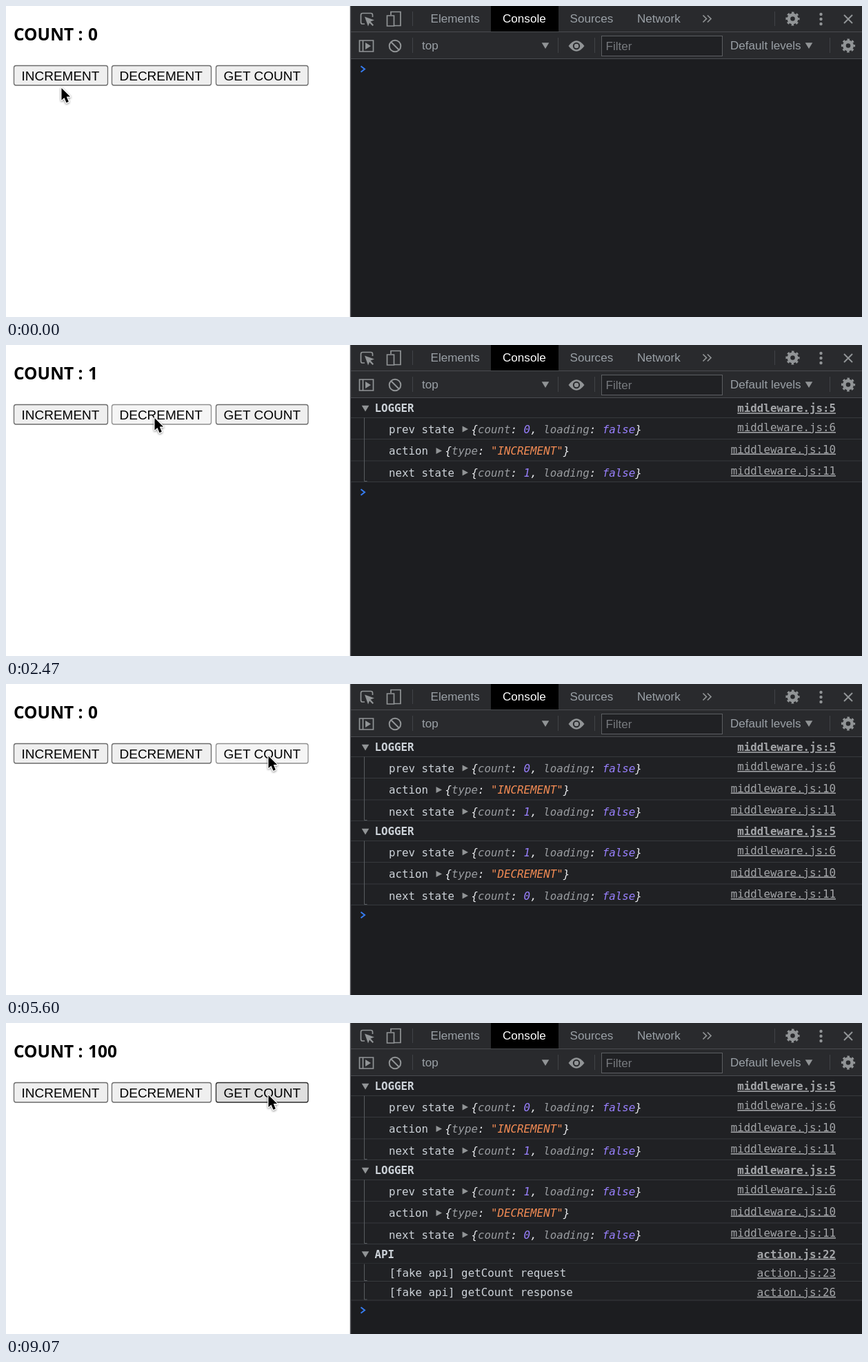
Animation, 1241 px wide and 451 px high, one loop 9270 ms. Source, as an HTML page:

```html
<!DOCTYPE html>
<html lang="en">
<head>
<meta charset="utf-8">
<title>Counter with logger</title>
<style>
  html, body { margin: 0; width: 100%; height: 100%; overflow: hidden; background: #fff; }
  svg { display: block; }
  .count { font: 600 24.5px "Noto Sans", sans-serif; }
  .btn text { font: 19px "Liberation Sans", Arial, sans-serif; fill: #000; }
  .btn rect { fill: #efefef; stroke: #6b6b6b; stroke-width: 1.3; }
  .btn.hover rect { fill: #f5f5f5; stroke: #8f8f8f; }
  .btn.pressed rect { fill: #dfdfdf; stroke: #2c2c2c; }
  .ui { font: 17.1px "Liberation Sans", Arial, sans-serif; fill: #9aa0a6; }
  .log { font: 15.8px "DejaVu Sans Mono", monospace; fill: #cdd3d9; }
  .log .head { font-weight: bold; }
  .log .link { fill: #a4a6a9; text-anchor: end; text-decoration: underline; }
  .obj { font-style: italic; fill: #e8eaed; }
  .key { fill: #9a9da1; }
  .num { fill: #9980ff; }
  .str { fill: #f28b54; }
  .icon { fill: none; stroke: #919496; stroke-width: 1.7; }
  .solid { fill: #919496; }
  .line { fill: none; stroke: #36393d; }
  .cursor { filter: drop-shadow(0 1.5px 1.5px #0007); }
</style>
</head>
<body>
<svg width="1241" height="451" viewBox="0 0 1241 451">
  <defs>
    <g id="gear" class="icon">
      <circle r="5.6" stroke-width="4.6"/>
      <circle r="8.6" stroke-width="3" stroke-dasharray="3.4 3.354" stroke-dashoffset="1.7"/>
    </g>
    <path id="down" class="solid" d="M-5.3-4.2H5.3L0 4.6Z"/>
  </defs>

  <text class="count" x="11" y="50">COUNT :</text>
  <text class="count" id="value" x="119" y="50"></text>
  <g id="buttons"></g>

  <rect x="499" width="742" height="451" fill="#1c1d20"/>
  <rect x="499" width="742" height="77" fill="#292a2d"/>
  <rect x="703" width="98" height="37" fill="#000"/>
  <path d="M500 37.5H1241M500 76.5H1241" stroke="#4a4c50"/>
  <path d="M589.5 8V29M1114.5 8V29M589.5 46V68M800.5 46V68M853.5 46V68M1194.5 46V68" stroke="#414347"/>

  <g class="ui">
    <text x="615.5" y="24">Elements</text>
    <text x="720" y="24" fill="#fff">Console</text>
    <text x="817.5" y="24">Sources</text>
    <text x="915" y="24">Network</text>
    <text x="603" y="63">top</text>
    <rect x="863.5" y="43.5" width="175" height="29" fill="#202124" stroke="#5c5e62"/>
    <text x="869.5" y="64" fill="#777a7e">Filter</text>
    <text x="1050" y="63">Default levels</text>
  </g>

  <g class="icon">
    <path d="M520 26H517Q514.500 26 514.500 23.500V13Q514.500 10.500 517 10.500H529Q531.500 10.500 531.500 13V16"/>
    <path class="solid" stroke="none" d="M520 15.500L534 20.500 528.500 22.500 533 27.500 531.500 29 527 24.500 525 29.500Z"/>
    <path d="M558 13V8.500H572V28.500H563M552.500 14H562.500V29H552.500Z"/>
    <path d="M1010.500 13.500L1015.500 18.500 1010.500 23.500M1017 13.500L1022 18.500 1017 23.500"/>
    <path d="M1215 13L1227 25M1227 13L1215 25" stroke-width="2"/>
    <path d="M512.500 50H532.500V66H512.500ZM517.500 50V66"/>
    <path class="solid" stroke="none" d="M521 53V63L529 58Z"/>
    <circle cx="564" cy="58" r="8.300" stroke-width="2"/>
    <path d="M558 52L570 64" stroke-width="2"/>
    <path class="solid" stroke="none" d="M815.500 58Q827 42.500 838.500 58 827 73.500 815.500 58Z"/>
    <circle cx="827" cy="58" r="4.200" stroke="#292a2d" stroke-width="2"/>
  </g>
  <g class="solid">
    <circle cx="1181.500" cy="12" r="2.200"/>
    <circle cx="1181.500" cy="19" r="2.200"/>
    <circle cx="1181.500" cy="26" r="2.200"/>
  </g>
  <use href="#gear" x="1140.500" y="18.500"/>
  <use href="#gear" x="1221" y="57.500"/>
  <use href="#down" x="782" y="57.500"/>
  <use href="#down" x="1164" y="57.500"/>
  <path d="M499.500 0V451" stroke="#505256" stroke-width="1.500"/>

  <g id="log" class="log"></g>
  <path id="prompt" d="M514.500-4.200L520 0 514.500 4.200" fill="none" stroke="#367cf1" stroke-width="2"/>

  <path id="cursor" class="cursor" d="M0 0V17.500L4 13.900 7 21.200 10.300 19.800 7.300 12.600H12.600Z"
    stroke="#fff" stroke-width="2.600" stroke-linejoin="round" paint-order="stroke"/>
</svg>

<script>
const LOOP = 9270, TICK = 200 / 3;
const $ = id => document.getElementById(id);

const buttons = [
  { label: 'INCREMENT', x: 11.5, w: 136, click: 10 },
  { label: 'DECREMENT', x: 153.5, w: 144, click: 54 },
  { label: 'GET COUNT', x: 304.5, w: 133.500, click: 93 },
];
$('buttons').innerHTML = buttons.map(b => `<g class="btn">
  <rect x="${b.x}" y="86.5" width="${b.w}" height="28.500" rx="3"/>
  <text x="${b.x + 11}" y="107.500">${b.label}</text></g>`).join('');
const buttonNodes = [...$('buttons').children];

// Console entries
const span = (type, text) => `<tspan class="${type}">${text}</tspan>`;
const text = (x, y, body, type = '') => `<text class="${type}" x="${x}" y="${y}">${body}</text>`;
const rule = y => `<path class="line" d="M500 ${y}H1241"/>`;
const guide = (top, bottom) =>
  `<path d="M519.500 ${top}V${bottom}" fill="none" stroke="#595c60"/>`;
const foot = y => `<path d="M519.500 ${y}h4" stroke="#595c60"/>`;
const back = (y, h) => `<rect x="500" y="${y}" width="741" height="${h}" fill="#202124"/>`;
const head = (y, title, link) => back(y - 14, 28) +
  `<use href="#down" x="521" y="${y + 0.5}"/>` +
  text(534.5, y + 5.7, title, 'head') + text(1203, y + 5.7, link, 'head link') + rule(y + 14);

function objectRow(y, label, body, link) {
  const x = 555 + label.length * 9.51 + 12;
  return text(555, y + 5.500, label) +
    `<path class="solid" d="M${x - 0.5} ${y - 4.500}V${y + 4.500}L${x + 8} ${y}Z"/>` +
    text(x + 12.400, y + 5.500, body, 'obj') + text(1203, y + 3, link, 'link');
}

const state = n => `{${span('key', 'count')}: ${span('num', n)}, ` +
  `${span('key', 'loading')}: ${span('num', 'false')}}`;

const logger = (y, before, type, after) => head(y, 'LOGGER', 'middleware.js:5') +
  back(y + 14, 93) +
  objectRow(y + 30.500, 'prev state', state(before), 'middleware.js:6') + rule(y + 45) +
  objectRow(y + 62, 'action', `{${span('key', 'type')}: ${span('str', `"${type}"`)}}`, 'middleware.js:10') +
  rule(y + 76.500) +
  objectRow(y + 93.500, 'next state', state(after), 'middleware.js:11') + rule(y + 107) +
  rule(y + 14) + guide(y + 14, y + 106) + foot(y + 106);

const apiRow = (y, word, line) => back(y - 13.500, 27) +
  text(555.5, y + 5.700, `[fake api] getCount ${word}`) +
  text(1203, y + 5.700, `action.js:${line}`, 'link') +
  rule(y + 12) + guide(y - 13, y + 11);

const entries = [
  { at: 11, prompt: 213.5, body: logger(91.5, 0, 'INCREMENT', 1) },
  { at: 54, prompt: 335, body: logger(213.5, 1, 'DECREMENT', 0) },
  { at: 95, prompt: 389.5, body: head(335, 'API', 'action.js:22') + apiRow(362.5, 'request', 23) + foot(373.5) },
  { at: 124, prompt: 416.5, body: apiRow(390, 'response', 26) + foot(401) },
];
$('log').innerHTML = entries.map(e => `<g>${e.body}</g>`).join('');
const entryNodes = [...$('log').children];

const values = [[0, '0'], [11, '1'], [54, '0'], [93, 'loading...'], [124, '100']];
// Pointer moves: start tick, end tick, target
const moves = [[0, 5, 79.5, 109], [31, 37, 215.5, 106], [78, 84, 380.5, 104.5]];

function pointer(k) {
  let x = 80.5, y = 119;
  for (const [from, to, tx, ty] of moves) {
    const p = Math.min(1, Math.max(0, (k - from) / (to - from)));
    const e = p * p * (3 - 2 * p);
    x += (tx - x) * e;
    y += (ty - y) * e;
  }
  return [x, y];
}

function draw(now) {
  const k = Math.floor((now % LOOP + 3.4) / TICK);
  // The first approach pauses halfway
  const [x, y] = pointer(k === 3 ? 2.5 : k === 2 ? 2.5 : k);
  $('cursor').setAttribute('transform', `translate(${x} ${y})`);
  buttons.forEach((b, i) => {
    const over = x > b.x && x < b.x + b.w && y < 117;
    const mode = !over ? '' : k >= b.click ? ' pressed' : ' hover';
    buttonNodes[i].setAttribute('class', 'btn' + mode);
  });
  $('value').textContent = values.filter(v => k >= v[0]).pop()[1];
  let promptY = 91.5;
  entries.forEach((e, i) => {
    const shown = k >= e.at;
    entryNodes[i].style.display = shown ? '' : 'none';
    if (shown) promptY = e.prompt;
  });
  $('prompt').setAttribute('transform', `translate(0 ${promptY})`);
}

const start = performance.now();
function loop() {
  draw(performance.now() - start);
  requestAnimationFrame(loop);
}
loop();
</script>
</body>
</html>
```
